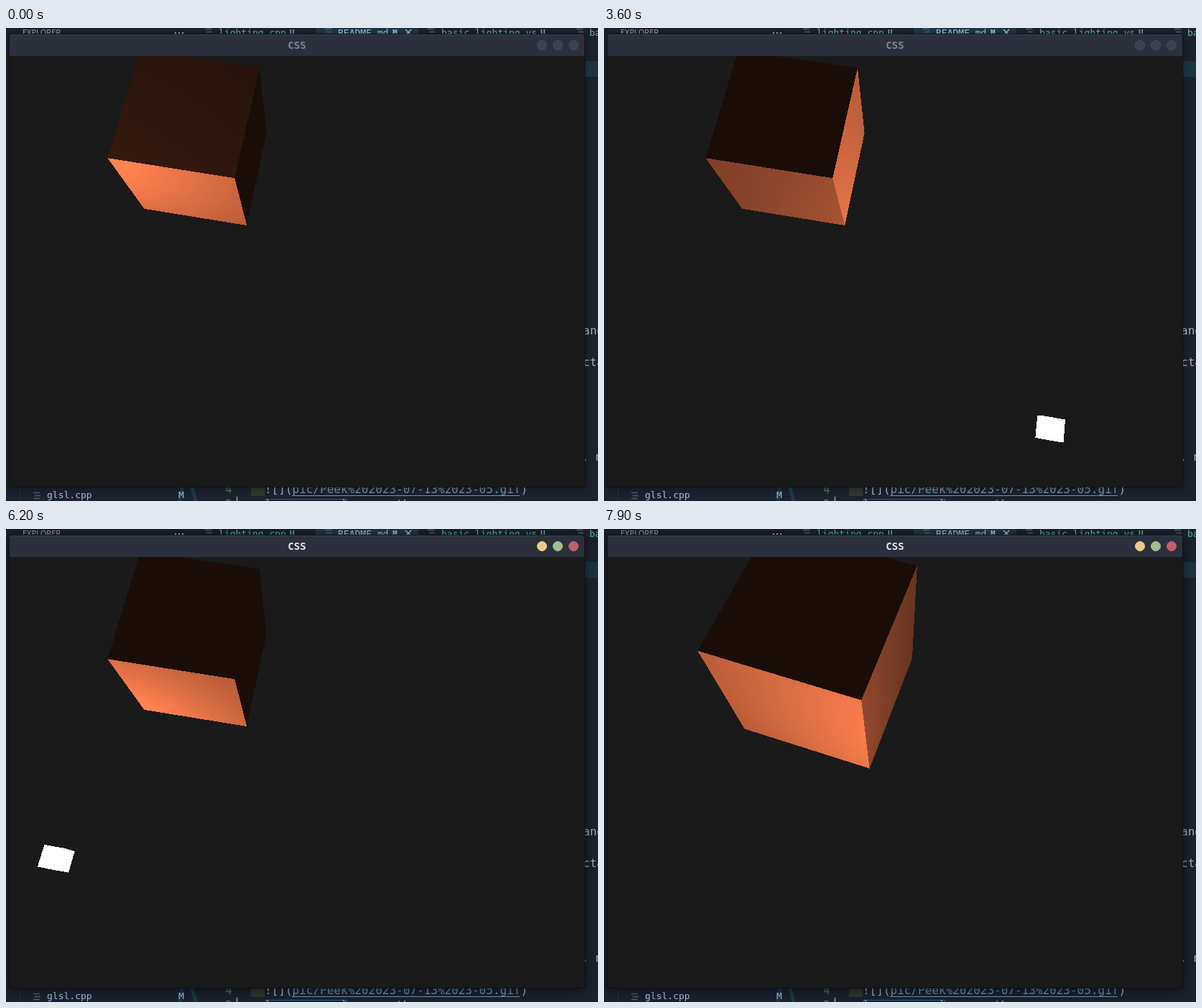
Write an HTML page with a canvas that moves like this. It is 824 by 659 pixels and loops after 8 s.

```html
<!DOCTYPE html>
<html lang="en">
<head>
<meta charset="utf-8">
<title>Basic lighting</title>
<style>
  html, body { margin: 0; width: 100%; height: 100%; overflow: hidden; background: #1b212d; }
  svg { position: absolute; left: 0; top: 0; }
  text { white-space: pre; font: 13px "DejaVu Sans Mono", monospace; }
  .code { font-size: 16px; fill: #a3adbb; }
  .new { fill: #57b5a5; }
  .changed { fill: #9cc3e0; }
  .mark { font-size: 11px; font-weight: bold; }
  #window {
    position: absolute; left: 5px; top: 9px; width: 800px; height: 630px;
    border-radius: 4px 4px 0 0; background: #2b303c;
    box-shadow: 0 0 0 1px #10131a, 0 1px 8px rgba(0, 0, 0, .5);
  }
  #bar {
    height: 29px; border-top: 1px solid #3b424f; border-radius: 4px 4px 0 0;
    font: bold 14px/28px "DejaVu Sans Mono", monospace; text-align: center; color: #7f8593;
  }
  #bar i {
    position: absolute; top: 8px; width: 14px; height: 14px; box-sizing: border-box;
    border-radius: 50%; background: #3a4254; border: 1px solid #434b5e;
  }
  #window.focused { box-shadow: 0 0 0 1px #0e1117, 0 2px 16px rgba(0, 0, 0, .65); }
  .focused #bar { color: #e3e8f0; }
  .focused #bar i { background: var(--lit); border-color: var(--lit); }
  canvas { position: absolute; left: 0; top: 30px; }
</style>
</head>
<body>
<svg width="824" height="659">
  <defs>
    <path id="file" d="M0 .5h9M2 4.5h8M0 8.5h9" stroke="#525c6c" stroke-width="1.3"/>
  </defs>
  <path d="M431 0h143v9h-143z" fill="#203641"/>
  <path d="M806 46h18v22h-18z" fill="#1d343f"/>
  <text x="23" y="10" style="font: 11px 'Noto Sans', sans-serif" fill="#9ba4b1">EXPLORER</text>
  <path d="M235 7h2m3 0h2m3 0h2" stroke="#a3adbb" stroke-width="2"/>
  <use href="#file" x="277" y="1"/>
  <use href="#file" x="444" y="1"/>
  <use href="#file" x="587" y="1"/>
  <use href="#file" x="794" y="1"/>
  <text x="296" y="11" class="new">lighting.cpp</text>
  <text x="395" y="10" class="new mark">U</text>
  <text x="462" y="11" class="changed">README.md</text>
  <text x="538" y="10" class="changed mark">M</text>
  <path d="M556 2l8 8m0-8l-8 8" stroke="#b9c4d0" stroke-width="1.2"/>
  <text x="606" y="11" class="new">basic_lighting.vs</text>
  <text x="744" y="10" class="new mark">U</text>
  <text x="812" y="11" class="new">ba</text>

  <text x="803" y="427" class="code">ang</text>
  <text x="803" y="471" class="code">cta</text>
  <text x="801" y="603" class="code">, n</text>

  <path d="M19.500 640v19" stroke="#272e3b"/>
  <path d="M245 640l-3 19m17-19l5 19" stroke="#1d424f" stroke-width="5" opacity=".7"/>
  <use href="#file" x="38" y="647"/>
  <text x="57" y="655" class="changed">glsl.cpp</text>
  <text x="240" y="655" class="changed" font-weight="bold">M</text>
  <text x="305" y="648" class="code" style="fill:#417b5a">4</text>
  <text x="305" y="669" class="code" style="fill:#417b5a">5</text>
  <path d="M321.500 653v6" stroke="#788390" stroke-width="2"/>
  <path d="M341 640h19v12h-19z" fill="#30352f"/>
  <text x="360" y="648" class="code">![](<tspan fill="#6c91a8">pic/Peek%202023-07-13%2023-05.gif</tspan>)</text>
  <path d="M398 651.500h317" stroke="#6c91a8"/>
  <path d="M361.500 660v-3.500h113v3.500" stroke="#28627a" fill="none"/>
  <text x="360" y="669" class="code">`          `       the</text>
</svg>

<div id="window">
  <div id="bar">CSS
    <i style="left:734px; --lit:#ebcb8b"></i>
    <i style="left:756px; --lit:#a3be8c"></i>
    <i style="left:778px; --lit:#bf616a"></i>
  </div>
  <canvas id="view" width="800" height="600"></canvas>
</div>

<svg id="pointer" width="40" height="50">
  <path d="M2 2L24 25L13 27L2 35Z" fill="#1b1d22" stroke="#fff" stroke-width="2.500" stroke-linejoin="round"/>
</svg>

<script>
const LOOP = 8000, STEP = 100;
const WIDTH = 800, HEIGHT = 600;
const FOCAL = HEIGHT / 2 / Math.tan(Math.PI / 8);   // 45 degree field of view
const CORAL = [255, 127.5, 79], AMBIENT = 0.1;
const ORIGIN = [0, 0, 0], CUBE_HALF = 0.5, LAMP_HALF = 0.1;
const EYE = [1.27, 4.115, 2.169], DOLLY = [-0.134, -1.1, -0.376];
const FOCUS_AT = 4800;

const windowBox = document.getElementById('window');
const pointer = document.getElementById('pointer');
const context = document.getElementById('view').getContext('2d');
const image = context.createImageData(WIDTH, HEIGHT);

// Progress from 0 to 1 between two times.
const ramp = (t, from, to) => Math.min(1, Math.max(0, (t - from) / (to - from)));
const smooth = p => p * p * (3 - 2 * p);

function lampAt(t) {
  const phase = 4.822 + t / 1000;
  return [1 + 2 * Math.sin(phase), Math.sin(phase / 2), 2];
}

function cameraAt(t) {
  const dolly = ramp(t, 7200, 7700);
  const degree = Math.PI / 180;
  const yaw = (-9.8 - 9.4 * smooth(ramp(t, 6450, 7050)) + 0.4 * dolly) * degree;
  const pitch = (-74 + 5.7 * ramp(t, 7100, 7500)) * degree;
  const sy = Math.sin(yaw), cy = Math.cos(yaw), sp = Math.sin(pitch), cp = Math.cos(pitch);
  return {
    eye: EYE.map((v, i) => v + DOLLY[i] * dolly),
    right: [cy, 0, sy],
    up: [-sy * sp, cp, cy * sp],
    forward: [sy * cp, sp, -cy * cp],
  };
}

// Distance at which a ray enters an axis-aligned cube; hitAxis is the face's axis.
let hitAxis = 0;
function cast(eye, ray, center, half) {
  let near = -Infinity, far = Infinity;
  for (let i = 0; i < 3; i++) {
    const middle = (center[i] - eye[i]) / ray[i];
    const reach = half / Math.abs(ray[i]);
    if (middle - reach > near) { near = middle - reach; hitAxis = i; }
    if (middle + reach < far) far = middle + reach;
  }
  return near < far && near > 0 ? near : Infinity;
}

function brightness(eye, ray, distance, axis, lamp) {
  let squared = 0, facing = 0;
  for (let i = 0; i < 3; i++) {
    const toLamp = lamp[i] - eye[i] - ray[i] * distance;
    squared += toLamp * toLamp;
    if (i === axis) facing = -Math.sign(ray[i]) * toLamp;
  }
  return AMBIENT + Math.max(0, facing / Math.sqrt(squared));
}

function drawScene(t) {
  const { eye, right, up, forward } = cameraAt(t);
  const lamp = lampAt(t), ray = [0, 0, 0], pixels = image.data;
  let k = 0;
  for (let row = 0; row < HEIGHT; row++) {
    const y = (HEIGHT / 2 - row - 0.5) / FOCAL;
    for (let column = 0; column < WIDTH; column++, k += 4) {
      const x = (column + 0.5 - WIDTH / 2) / FOCAL;
      for (let i = 0; i < 3; i++) ray[i] = forward[i] + x * right[i] + y * up[i];
      const lampDistance = cast(eye, ray, lamp, LAMP_HALF);
      const cubeDistance = cast(eye, ray, ORIGIN, CUBE_HALF);
      let r = 26, g = 26, b = 26;
      if (cubeDistance < lampDistance) {
        const light = brightness(eye, ray, cubeDistance, hitAxis, lamp);
        r = CORAL[0] * light;
        g = CORAL[1] * light;
        b = CORAL[2] * light;
      } else if (lampDistance < Infinity) {
        r = g = b = 255;
      }
      pixels[k] = r;
      pixels[k + 1] = g;
      pixels[k + 2] = b;
      pixels[k + 3] = 255;
    }
  }
  context.putImageData(image, 0, 0);
}

function drawPointer(t) {
  const left = 1 - smooth(ramp(t, 4100, 4500));
  pointer.style.display = t > 4100 && t < FOCUS_AT ? '' : 'none';
  pointer.style.transform = `translate(${385 + 40 * left}px, ${11 - 50 * left}px)`;
}

let shown = -1;
function tick() {
  let t = Math.floor(performance.now() % LOOP / STEP) * STEP;
  if (t < 2 * STEP) t = 0;   // the opening picture holds for two steps
  if (t !== shown) {
    shown = t;
    drawScene(t);
    drawPointer(t);
    windowBox.classList.toggle('focused', t >= FOCUS_AT);
  }
  requestAnimationFrame(tick);
}
tick();
</script>
</body>
</html>
```
